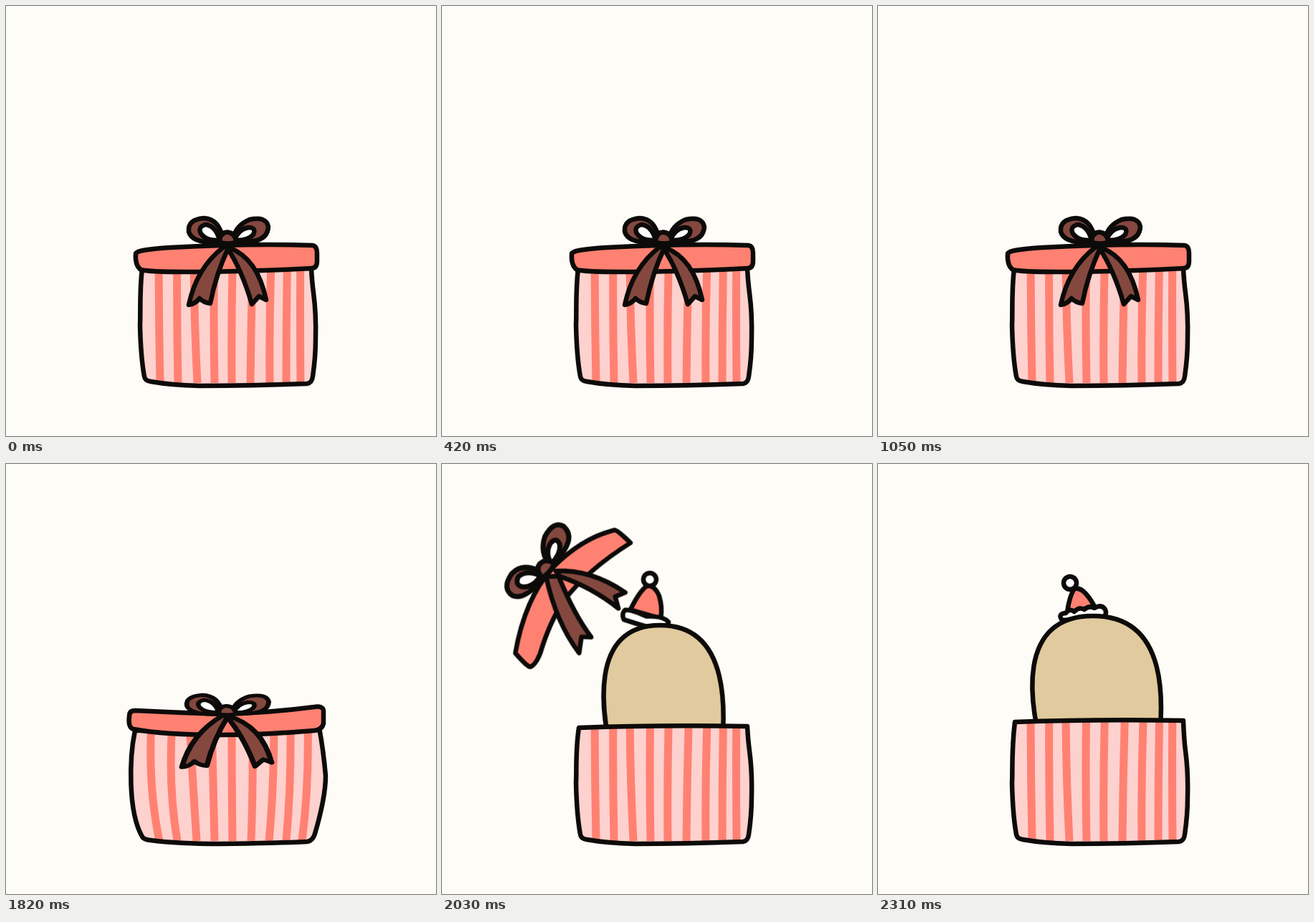
An HTML page without scripts for the animation above (3.43 s loop, 600 by 600 pixels).

```html
<!DOCTYPE html>
<html lang="en">
<head>
<meta charset="utf-8">
<title>Gift box surprise</title>
<style>
  html, body { margin: 0; width: 100%; height: 100%; overflow: hidden; background: #fdfcf7; }
  svg { display: block; width: 100%; height: 100%; }

  .ink { stroke: #0c0b09; stroke-width: 6.5; stroke-linejoin: round; stroke-linecap: round; }
  .ink, .ink * { vector-effect: non-scaling-stroke; }
  .none { fill: none; }
  .pink { fill: #fdd1ce; }
  .coral { fill: #ff8172; }
  .brown { fill: #84483f; }
  .white { fill: #fff; }
  .tan { fill: #e1ca9d; }
  .stripes { fill: none; stroke: #ff8172; stroke-width: 11; }
  .rays { fill: none; stroke: #ffe23d; stroke-width: 6.5; stroke-linecap: round; stroke-dasharray: 70 300; }

  /* 49 ticks of 70 ms, every pose held hard */
  .rest, .squash, .stretch, .burst, .open, .settled, .lid, .hero, .hat, .rays {
    animation: 3430ms step-end infinite;
  }
  .rest { animation-name: rest; }
  .squash { animation-name: squash; }
  .stretch { animation-name: stretch; }
  .burst { animation-name: burst; }
  .open { animation-name: open; }
  .settled { animation-name: settled; }
  .lid { animation-name: lid; transform-origin: 219px 187px; }
  .hero { animation-name: hero; transform-origin: 304px 400px; }
  .hat { animation-name: hat; transform-origin: 285px 205px; }
  .rays { animation-name: rays; }

  @keyframes rest {
    0%, 12.24%, 30.61% { opacity: 1; }
    8.16%, 26.53%, 53.06%, 100% { opacity: 0; }
  }
  @keyframes squash {
    0%, 10.2%, 28.57%, 55.1%, 100% { opacity: 0; }
    8.16%, 26.53%, 53.06% { opacity: 1; }
  }
  @keyframes stretch {
    0%, 12.24%, 30.61%, 57.14%, 100% { opacity: 0; }
    10.2%, 28.57%, 55.1% { opacity: 1; }
  }
  @keyframes burst {
    0%, 59.18%, 100% { opacity: 0; }
    57.14% { opacity: 1; }
  }
  @keyframes open {
    0%, 67.34%, 100% { opacity: 0; }
    59.18% { opacity: 1; }
  }
  @keyframes settled {
    0% { opacity: 0; }
    67.34%, 100% { opacity: 1; }
  }
  @keyframes lid {
    0%, 61.22%, 100% { opacity: 0; }
    57.14% { opacity: 1; transform: none; }
    59.18% { opacity: 1; transform: translate(-75px, -42px) rotate(-15deg); }
  }
  @keyframes hero {
    0% { opacity: 0; }
    57.14% { opacity: 1; transform: translate(8px, 9px) scaleX(.8); }
    59.18% { opacity: 1; transform: translate(4px, 13px) scaleX(.93); }
    61.22% { opacity: 1; transform: translate(2px, -5px); }
    63.26% { opacity: 1; transform: translate(2px, 8px); }
    65.3% { opacity: 1; transform: translate(1px, 4px); }
    67.34%, 100% { opacity: 1; transform: none; }
  }
  @keyframes hat {
    0%, 67.34%, 100% { opacity: 0; }
    57.14% { opacity: 1; transform: translate(-15px, 42px) rotate(65deg); }
    59.18% { opacity: 1; transform: translate(-3px, 16px) rotate(20deg); }
    61.22% { opacity: 1; transform: translate(0, -9px); }
    63.26% { opacity: 1; transform: none; }
    65.3% { opacity: 1; transform: translate(-2px, 8px); }
  }
  @keyframes rays {
    0%, 67.34%, 100% { opacity: 0; }
    61.22% { opacity: 1; stroke-dashoffset: 0; }
    63.26% { opacity: 1; stroke-dashoffset: -35; }
    65.3% { opacity: 1; stroke-dashoffset: -70; }
  }
</style>
</head>
<body>
<svg viewBox="0 0 600 600" role="img" aria-label="A gift box wobbles and pops open">
  <defs>
    <path id="box-rest" d="M190 366C186 400 188 430 187 445Q188 490 193 517Q194 523 202 524Q230 529 270 530Q340 530 420 527Q427 526 428 517Q432 490 432 465Q433 430 429 400Q427 385 426 366Z"/>
    <path id="box-squash" d="M180 372C172 410 170 485 190 520Q192 524 202 525Q240 530 300 530Q380 529 420 527Q428 526 431 516Q446 465 446 435Q443 400 437 368Z"/>
    <path id="box-burst" d="M189 359L238 347Q320 320 424 349Q427 351 427 362Q427 385 429 400Q433 430 432 465Q432 490 428 517Q427 526 420 527Q340 530 270 530Q230 529 202 524Q194 523 193 517Q188 490 187 445C188 430 186 400 189 359Z"/>
    <path id="box-open" d="M191 368Q300 364 426 366Q427 385 429 400Q433 430 432 465Q432 490 428 517Q427 526 420 527Q340 530 270 530Q230 529 202 524Q194 523 193 517Q188 490 187 445C188 430 186 400 191 368Z"/>
    <path id="box-settled" d="M191 360Q300 356 426 358Q427 385 429 400Q433 430 432 465Q432 490 428 517Q427 526 420 527Q340 530 270 530Q230 529 202 524Q194 523 193 517Q188 490 187 445C188 430 186 400 191 360Z"/>
    <clipPath id="in-rest"><use href="#box-rest"/></clipPath>
    <clipPath id="in-squash"><use href="#box-squash"/></clipPath>
    <clipPath id="in-burst"><use href="#box-burst"/></clipPath>
    <clipPath id="in-open"><use href="#box-open"/></clipPath>
    <clipPath id="in-settled"><use href="#box-settled"/></clipPath>

    <path id="stripes" d="M213 330Q213 430 215 526M239 330Q238 430 240 526M262 330Q262 430 267 526M291 330Q289 430 291 526M317 330Q314 430 315 526M345 330Q342 430 341 526M371 330Q367 430 368 526M393 330Q391 430 391 526M411 330Q410 430 411 526"/>
    <path id="stripes-squash" d="M203 360Q198 450 214 526M232 360Q226 450 239 526M256 360Q261 450 266 526M287 360Q289 450 291 526M315 360Q315 450 316 526M344 360Q345 450 342 526M374 360Q374 450 367 526M397 360Q398 450 391 526M421 360Q423 450 413 526"/>

    <g id="loops" class="brown">
      <path d="M303 327Q298 297 276 296Q253 298 255 315Q260 332 300 330Z"/>
      <path d="M316 327Q320 306 340 298Q363 293 366 308Q365 325 345 328Q330 331 316 329Z"/>
      <path class="white" d="M298 326Q292 306 278 305Q266 309 273 319Q282 329 298 326ZM319 327Q323 312 338 309Q350 309 345 319Q337 328 319 327Z"/>
      <path d="M298 330Q298 316 309 315.500Q321 317 321 330Q310 333 298 330Z"/>
    </g>
    <g id="tails" class="brown">
      <path d="M304 336Q266 365 255 417Q264 416 270 408Q276 414 285 415Q293 374 310 338Z"/>
      <path d="M311 337Q351 352 363 410L353 405L343 416Q329 368 309 338Z"/>
    </g>

    <g id="closed">
      <use href="#box-rest" class="pink"/>
      <g clip-path="url(#in-rest)"><use href="#stripes" class="stripes"/></g>
      <g class="ink">
        <use href="#box-rest" class="none"/>
        <path class="coral" d="M181 346Q180 340 230 337Q340 331 428 334Q434 335 434 345L434 356Q434 366 426 366Q330 371 250 371Q200 371 188 368Q180 362 181 346Z"/>
        <use href="#tails"/>
        <use href="#loops"/>
      </g>
    </g>
  </defs>

  <rect width="600" height="600" fill="#fdfcf7"/>

  <g class="rest"><use href="#closed"/></g>
  <g class="stretch"><use href="#closed" transform="translate(310 530) scale(.97 1.025) translate(-310 -530)"/></g>
  <g class="squash">
    <use href="#box-squash" class="pink"/>
    <g clip-path="url(#in-squash)"><use href="#stripes-squash" class="stripes"/></g>
    <g class="ink">
      <use href="#box-squash" class="none"/>
      <path class="coral" d="M172 352Q172 344 180 344Q240 347 300 349Q370 347 430 339Q442 337 443 344L443 362Q441 371 430 372Q360 378 300 378Q220 378 178 370Q170 368 172 352Z"/>
      <use href="#tails" transform="matrix(1.16 0 0 .89 -50.4 51.8)"/>
      <use href="#loops" transform="matrix(1.03 0 0 .78 -10.3 91.5)"/>
    </g>
  </g>

  <g class="rays">
    <path pathLength="140" d="M208 203L99 112"/>
    <path pathLength="140" d="M197 230L58 229"/>
    <path pathLength="140" d="M388 199L494 85"/>
    <path pathLength="140" d="M404 213L532 168"/>
  </g>

  <g class="hat ink">
    <path class="coral" d="M261 195Q264 165 272 155Q282 152 292 163Q302 176 305 192Z"/>
    <path class="white" d="M254 198Q262 194 285 196Q308 187 317 193Q318 203 311 207Q290 210 257 211Q251 205 254 198Z"/>
    <circle class="white" cx="272" cy="146" r="9"/>
  </g>
  <g class="settled ink">
    <path class="coral" d="M264 207Q267 184 274 174Q282 172 290 181Q298 190 303 201Z"/>
    <path class="white" d="M257 218Q250 209 262 208Q267 201 274 206Q280 199 288 203Q294 197 302 201Q312 195 317 203Q321 212 310 215Z"/>
    <circle class="white" cx="268" cy="166" r="9"/>
  </g>

  <g class="hero ink">
    <path class="tan" d="M236 420C206 330 195 212 300 212C405 212 402 330 388 420Z"/>
  </g>

  <g class="burst">
    <use href="#box-burst" class="pink"/>
    <g clip-path="url(#in-burst)"><use href="#stripes" class="stripes"/></g>
    <use href="#box-burst" class="ink none"/>
  </g>
  <g class="open">
    <use href="#box-open" class="pink"/>
    <g clip-path="url(#in-open)"><use href="#stripes" class="stripes"/></g>
    <use href="#box-open" class="ink none"/>
  </g>
  <g class="settled">
    <use href="#box-settled" class="pink"/>
    <g clip-path="url(#in-settled)"><use href="#stripes" class="stripes"/></g>
    <use href="#box-settled" class="ink none"/>
  </g>

  <g class="lid ink">
    <path class="coral" d="M148 291Q180 222 228 190Q278 160 326 161Q330 162 343 184Q275 205 232 238Q205 262 181 301Q170 315 163 315Q158 312 148 291Z"/>
    <g class="brown">
      <path d="M217 199Q214 265 234 314L243 293L256 297Q241 260 234 203Z"/>
      <path d="M232 195Q280 205 318 249L303 251L303 268Q275 230 236 204Z"/>
    </g>
    <use href="#loops" transform="translate(219 188) rotate(-35) scale(1.08) translate(-309 -325)"/>
  </g>
</svg>
</body>
</html>
```
